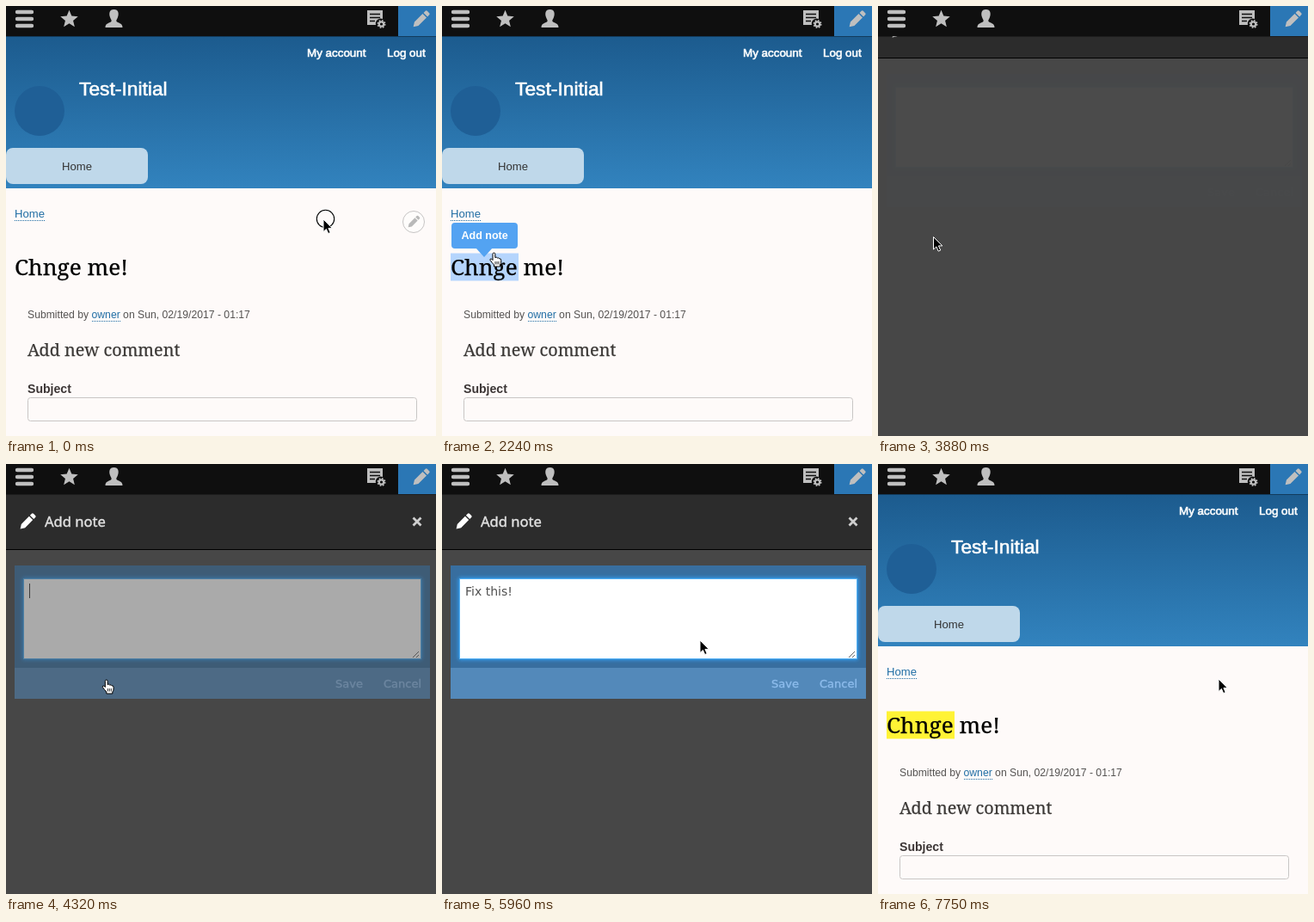
An HTML page for the animation above (8000 ms loop, 500 by 500 pixels).

```html
<!DOCTYPE html>
<html lang="en">
<head>
<meta charset="utf-8">
<title>Adding a note</title>
<style>
  html, body { margin: 0; width: 100%; height: 100%; overflow: hidden; background: #fefaf9; }
  svg { display: block; width: 500px; height: 500px; }
  text { font-family: "Liberation Sans", Arial, sans-serif; white-space: pre; }
  .serif { font-family: "Noto Serif", Georgia, serif; stroke-width: .25; }
  .ui { font-family: "DejaVu Sans", Verdana, sans-serif; }
  .white { fill: #fff; stroke: #fff; stroke-width: .6; }
  .link { fill: #1f6da4; }
  .dots { stroke: #1f6da4; stroke-dasharray: 1 1; }
</style>
</head>
<body>
<svg viewBox="0 0 500 500">
  <defs>
    <linearGradient id="sky" x2="0" y2="1">
      <stop offset="0" stop-color="#1c5b8e"/>
      <stop offset="1" stop-color="#3283be"/>
    </linearGradient>
    <filter id="glow" x="-10%" y="-20%" width="120%" height="140%"><feGaussianBlur stdDeviation="2.2"/></filter>
    <path id="pencil" transform="rotate(-45)" d="M-12.500 0L-7.500-3.200H6V3.200H-7.500ZM7.500-3.200H10.500Q12-3.200 12-1.700V1.700Q12 3.200 10.500 3.200H7.500Z"/>
  </defs>

  <g id="page">
    <rect width="500" height="500" fill="#fefaf9"/>
    <rect y="35" width="500" height="177" fill="url(#sky)"/>
    <circle cx="39" cy="122" r="29" fill="#1f5f96"/>
    <text class="white" x="85" y="104" font-size="22.800">Test-Initial</text>
    <g class="white" font-size="13.400">
      <text x="350" y="59">My account</text>
      <text x="443" y="59">Log out</text>
    </g>
    <rect y="165" width="165" height="42" rx="8" fill="#bfd8ea"/>
    <text x="65" y="191" font-size="13.100" fill="#333">Home</text>

    <text class="link" x="10" y="246" font-size="13.100">Home</text>
    <path class="dots" d="M10 249.500H45"/>
    <rect id="mark" x="10" y="287.500" width="79" height="32"/>
    <text class="serif" x="10" y="313" font-size="26.200" stroke="#000">Chnge me!</text>
    <text x="25" y="363" font-size="12.200" fill="#555352">Submitted by <tspan class="link">owner</tspan> on Sun, 02/19/2017 - 01:17</text>
    <path class="dots" d="M100 366.500H133"/>
    <text class="serif" x="25" y="407" font-size="19.800" fill="#3b3836" stroke="#3b3836">Add new comment</text>
    <text x="25" y="450" font-size="14.100" font-weight="bold" fill="#3b3535">Subject</text>
    <rect x="25.500" y="455.500" width="452" height="27" rx="3" fill="#fefaf9" stroke="#c8c6c5"/>

    <g id="edit">
      <circle r="12.500" fill="#fefcfb" stroke="#c6c4c4"/>
      <use href="#pencil" transform="scale(.72)" fill="#b9b9b9"/>
    </g>
    <g id="tip">
      <path d="M39 281H59L49 292Z" fill="#53a3f2"/>
      <rect x="11" y="252" width="77" height="30" rx="4" fill="#53a3f2"/>
      <text x="22.500" y="271" font-size="12.500" font-weight="bold" fill="#fff">Add note</text>
    </g>
    <g id="spinner" transform="translate(262 374)">
      <rect x="-16" y="-16" width="32" height="32" rx="5" fill="#363636"/>
      <g id="dots" fill="#fff"></g>
    </g>
  </g>

  <rect id="shade" y="35" width="500" height="465" fill="#474747"/>

  <g id="dialog">
    <rect y="35" width="500" height="64" fill="#2c2c2c"/>
    <path d="M0 99.500H500" stroke="#000"/>
    <use href="#pencil" transform="translate(25 67) scale(.95)" fill="#fff"/>
    <text x="45" y="73" font-size="16.600" fill="#e2e2e2" stroke="#e2e2e2" stroke-width=".4" style="font-family:'Noto Sans',sans-serif">Add note</text>
    <path d="M473.500 62.500L482.500 71.500M482.500 62.500L473.500 71.500" stroke="#cfcfcf" stroke-width="2.800"/>
    <g id="form">
      <rect x="10" y="118" width="483" height="119" fill="#386e9f"/>
      <rect x="10" y="237" width="483" height="36" fill="#5389ba"/>
      <rect x="19" y="132" width="465" height="96" rx="2" fill="#2f9df2" filter="url(#glow)"/>
      <rect x="20.500" y="133.500" width="462" height="93" fill="#fff" stroke="#56b1f4"/>
      <path d="M473 225L480 218M477 225L480 222" stroke="#666"/>
      <text id="note" class="ui" x="27" y="153" font-size="14" fill="#505050"></text>
      <rect id="caret" y="139" width="1" height="17" fill="#333"/>
      <g font-size="13" stroke-width=".35">
        <rect id="saveBox" x="373" y="237" width="52" height="36" fill="#3e6389"/>
        <rect id="cancelBox" x="425" y="237" width="68" height="36" fill="#3e6389"/>
        <text id="save" class="ui" x="383" y="260">Save</text>
        <text id="cancel" class="ui" x="439" y="260">Cancel</text>
      </g>
    </g>
  </g>

  <g id="toolbar">
    <rect width="500" height="35" fill="#0f0f0f"/>
    <rect y="35" width="500" height="1" fill="#000" opacity=".35"/>
    <rect x="456" width="44" height="35" fill="#2b77b5"/>
    <g fill="#bfbfbf">
      <path d="M13 7H30M13 15H30M13 23H30" stroke="#bfbfbf" stroke-width="4.400" stroke-linecap="round"/>
      <path id="star"/>
      <path d="M125.500 4C131 4 131.500 9 130 13C129 16 128 16 128.500 18C131 20 135.500 20 135.500 25H115.500C115.500 20 120 20 122.500 18C123 16 122 16 121 13C119.500 9 120 4 125.500 4Z"/>
      <path d="M420 5H438V15A6 6 0 0 0 430 22H420Z"/>
      <path d="M423 9.500H435M423 13.500H435M423 17.500H429" stroke="#0f0f0f" stroke-width="1.500"/>
      <circle cx="436.500" cy="21" r="2.700" fill="none" stroke="#bfbfbf" stroke-width="2.200"/>
      <circle cx="436.500" cy="21" r="4.200" fill="none" stroke="#bfbfbf" stroke-width="1.600" stroke-dasharray="1.650"/>
      <use href="#pencil" transform="translate(482.500 15.500)"/>
    </g>
  </g>

  <g id="cursor">
    <g id="ring" fill="none">
      <circle r="10.200" stroke="#fff" stroke-width="2.600" opacity=".5"/>
      <circle r="10.200" stroke="#000" stroke-width="1.100"/>
    </g>
    <path id="arrow" d="M0 0V14.500L3.400 11.400L5.700 16.600L8.200 15.500L5.900 10.400H10.300Z" fill="#000" stroke="#fff"/>
    <g id="beam" fill="none">
      <path d="M-2-8Q1.500-8 1.500-5V5Q1.500 8-2 8M5-8Q1.500-8 1.500-5M5 8Q1.500 8 1.500 5" stroke="#fff" stroke-width="2.600"/>
      <path d="M-2-8Q1.500-8 1.500-5V5Q1.500 8-2 8M5-8Q1.500-8 1.500-5M5 8Q1.500 8 1.500 5M-.5 2H3.500" stroke="#000"/>
    </g>
    <g id="hand">
      <path d="M0 3.500Q0 2 1.400 2T2.800 3.500V7.500Q4.700 6.500 5.300 8Q7 7.300 7.700 8.800Q9.700 8.500 9.700 10.500V13Q9.700 14.500 8.500 16V18H1.500V16Q-.5 14-3 10.500Q-3.300 8.500-1.500 9L0 10.500Z" fill="#fff" stroke="#000" stroke-linejoin="round"/>
      <path d="M3 12V15.500M5 12V15.500M7 12V15.500" stroke="#000" stroke-width=".8"/>
    </g>
  </g>
</svg>

<script>
const $ = id => document.getElementById(id);
const LOOP = 8000, TICK = 149, LAST = 52;

// Tables hold [tick, value, ...]
const path = [
  [1, 369, 248], [5, 150, 262], [6, 124, 284], [7, 62, 300], [8, 52, 309],
  [13, 52, 309], [14, 54, 298], [16, 64, 272], [17, 65, 270], [25, 65, 270],
  [26, 64.5, 268.5], [28, 64.5, 268.5], [31, 217, 210], [40, 300, 205],
  [43, 445, 261], [44, 425, 272], [45, 396, 250]
];
const shade = [[22, 0], [26, 1], [48, 1], [51, 0]];
const slide = [[25, -64], [26, -39], [28, 0], [48, 0], [50, -64]];
const fade = [[25, 0], [26, .02], [28, .35], [31, .92], [32, 1], [48, 1], [50, 0]];
const pointer = [[0, 'arrow'], [6, 'beam'], [15, 'hand'], [25, 'arrow'], [29, 'hand'],
  [33, ''], [40, 'arrow'], [42, 'hand'], [50, 'arrow']];
const typed = [[0, ''], [33, 'F'], [34, 'Fix '], [35, 'Fix th'], [36, 'Fix this'], [38, 'Fix this!']];
const marks = [[0, 'none'], [10, '#b5d5fd'], [30, 'none'], [51, '#fff335']];
const clicks = [[0, 0], [9, 10], [19, 22], [31, 31], [47, 47]];

const held = (table, n) => table.filter(k => k[0] <= n).pop()[1];
const within = (n, a, b) => n >= a && n <= b;
const show = (id, on) => { $(id).style.display = on ? '' : 'none'; };

function ramp(table, n, col = 1) {
  const i = table.findIndex(k => k[0] > n);
  if (i === 0) return table[0][col];
  if (i < 0) return table[table.length - 1][col];
  const a = table[i - 1], b = table[i];
  return a[col] + (b[col] - a[col]) * (n - a[0]) / (b[0] - a[0]);
}

function button(id, hover) {
  show(id + 'Box', hover);
  const color = hover ? '#fff' : '#8dbcec';
  $(id).setAttribute('fill', color);
  $(id).setAttribute('stroke', color);
}

const star = Array.from({ length: 10 }, (_, i) => {
  const a = i * Math.PI / 5, r = i % 2 ? 4.8 : 10.8;
  return [73.5 + r * Math.sin(a), 15.5 - r * Math.cos(a)].join(' ');
});
$('star').setAttribute('d', 'M' + star.join('L') + 'Z');

for (let i = 0; i < 8; i++) {
  const dot = document.createElementNS('http://www.w3.org/2000/svg', 'circle');
  dot.setAttribute('cx', 9 * Math.cos(i * Math.PI / 4));
  dot.setAttribute('cy', 9 * Math.sin(i * Math.PI / 4));
  dot.setAttribute('r', 2.5);
  $('dots').append(dot);
}

function draw(n) {
  $('mark').setAttribute('fill', held(marks, n));
  show('edit', n < 14);
  $('edit').setAttribute('transform', `translate(474 ${n < 6 ? 251 : 308})`);
  show('tip', within(n, 14, 26));
  show('spinner', within(n, 21, 24));
  [...$('dots').children].forEach((dot, i) => {
    dot.setAttribute('opacity', 1 - .1 * ((i + 28 - n) % 8));
  });

  $('shade').setAttribute('opacity', ramp(shade, n));
  show('dialog', within(n, 25, 49));
  $('dialog').setAttribute('transform', `translate(0 ${ramp(slide, n)})`);
  $('form').setAttribute('opacity', ramp(fade, n));

  const text = held(typed, n);
  $('note').textContent = text;
  const width = text ? $('note').getComputedTextLength() : 0;
  $('caret').setAttribute('x', Math.round(27 + width));
  show('caret', n >= 29 && !within(n, 40, 43));
  button('save', n >= 45);
  button('cancel', n === 43);

  const kind = held(pointer, n);
  ['arrow', 'beam', 'hand'].forEach(id => show(id, id === kind));
  show('ring', clicks.some(([a, b]) => within(n, a, b)));
  $('ring').setAttribute('transform', kind === 'beam' ? 'translate(1.500 .5)' : 'translate(2.500 -.5)');
  $('cursor').setAttribute('transform', `translate(${ramp(path, n, 1)} ${ramp(path, n, 2)})`);
}

let shown = -1;
function loop() {
  const n = Math.min(LAST, Math.floor((performance.now() % LOOP + 6) / TICK));
  if (n !== shown) draw(shown = n);
  requestAnimationFrame(loop);
}
loop();
</script>
</body>
</html>
```
